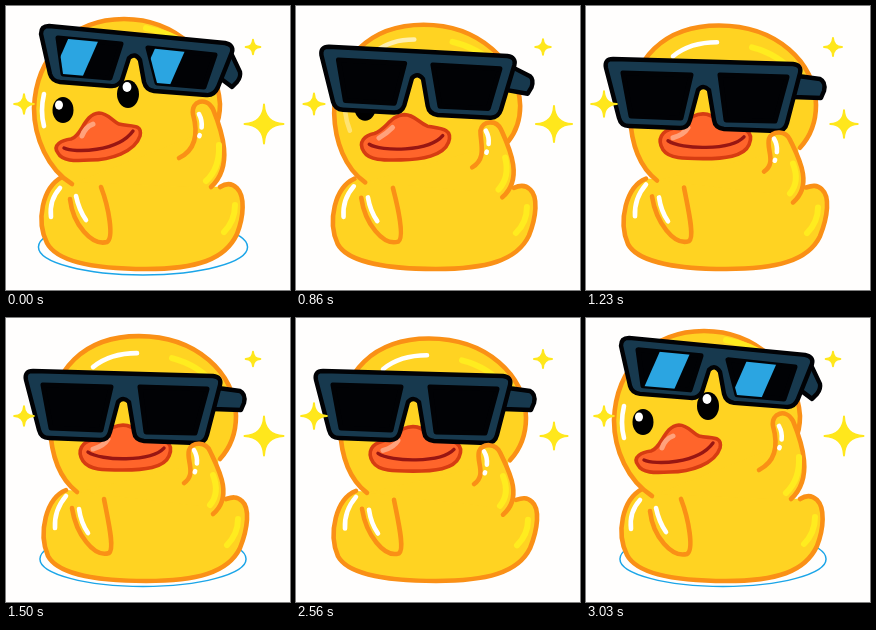
Recreate the animation shown at these times as an HTML page. Size 284 by 284 pixels, loop 3060 ms.

```html
<!DOCTYPE html>
<html lang="en">
<head>
<meta charset="utf-8">
<title>Duck with sunglasses</title>
<style>
  html, body { margin: 0; width: 100%; height: 100%; overflow: hidden; background: #fffefd; }
  svg { display: block; width: 100vw; height: 100vh; }
  path, ellipse { stroke-linecap: round; stroke-linejoin: round; }
  .star { fill: #ffe71c; stroke: #ffe71c; stroke-width: 2; }
  .ring { fill: none; stroke: #1ba5e8; }
  .skin { fill: #ffd322; stroke: #fa9016; stroke-width: 4.6; }
  .fill { fill: #ffd322; }
  .fold { fill: none; stroke: #fa9016; stroke-width: 4.6; }
  .shine { fill: none; stroke: #fff; stroke-width: 4.6; }
  .dash { stroke-dasharray: 14 8 1 99; }
  .glow { fill: none; stroke: #ffec1f; stroke-width: 6; }
  .beak { fill: #ff652b; stroke: #d63c12; stroke-width: 3.6; }
  .mouth { fill: none; stroke: #981612; stroke-width: 3.4; }
  .gleam { fill: none; stroke: #ffa27c; stroke-width: 5; }
  .frame { fill: #17394e; stroke: #010205; stroke-width: 4.4; }
  .lens { fill: #010205; stroke: #010205; stroke-width: 5; }
  .band { fill: #2ba5e1; }
</style>
</head>
<body>
<svg viewBox="0 0 284 284" preserveAspectRatio="none">
  <defs>
    <clipPath id="clip0"><path/></clipPath>
    <clipPath id="clip1"><path/></clipPath>
  </defs>
  <ellipse class="ring" cx="137" cy="241"/>
  <g id="duck">
    <g id="body"></g>
    <g id="eyes">
      <ellipse rx="10.5" ry="13"/><ellipse rx="11" ry="14"/>
      <ellipse rx="4" ry="4.6" fill="#fff"/><ellipse rx="4.4" ry="5" fill="#fff"/>
    </g>
    <g id="face"></g>
  </g>
  <g id="glasses"></g>
  <g id="arm"></g>
  <g id="stars"></g>
</svg>
<script>
const LOOP = 3060, BEAT = LOOP / 2, TAU = Math.PI * 2;
const $ = s => document.querySelector(s);
const mix = (a, b, k) => a + (b - a) * k;
const ease = (t, from, to) => {
  const x = Math.min(1, Math.max(0, (t - from) / (to - from)));
  return x * x * (3 - 2 * x);
};
const pulse = (t, at, width) => Math.exp(-(((t - at) / width) ** 2));

function add(parent, cls) {
  const el = document.createElementNS('http://www.w3.org/2000/svg', 'path');
  el.setAttribute('class', cls);
  return $(parent).appendChild(el);
}

// Each part has a path with the glasses up and one with the glasses down.
const parts = [];
function part(parent, cls, up, down) {
  const numbers = down.match(/-?[\d.]+/g).map(Number);
  const p = { el: add(parent, cls), up, numbers };
  parts.push(p);
  return p;
}
function blend({ up, numbers }, k) {
  let i = 0;
  return up.replace(/-?[\d.]+/g, n => mix(+n, numbers[i++], k).toFixed(2));
}

part('#body', 'skin',
  'M56 171C36 182 30 215 41 237C51 256 90 263 140 263C190 263 219 254 231 228C238 210 239 190 231 182C226 177 220 177 214 181',
  'M60 172C40 180 32 215 42 238C52 257 95 263 140 263C190 263 222 255 234 230C242 210 244 190 236 183C231 178 226 179 220 181');
part('#body', 'fill', 'M66 176L60 95L206 100L206 182Z', 'M71 174L62 95L213 128L210 190Z');
part('#body', 'skin',
  'M66 178C42 163 28 132 28 102C30 50 66 13 118 13C170 13 211 52 214 98C214 108 212 116 209 122',
  'M71 174C53 160 45 135 44 108C43 50 80 18 133 18C190 18 230 55 230 98C230 116 224 130 214 141');
part('#body', 'fold',
  'M95 181C103 202 108 232 101 236C86 240 67 219 64 193',
  'M98 181C102 202 109 231 103 235C88 240 70 216 66 190');
part('#body', 'shine', 'M54 182Q43 194 45 211', 'M60 178Q48 192 49 210');
part('#body', 'shine', 'M70 190Q73 204 80 214', 'M73 191Q75 205 82 215');
part('#body', 'glow', 'M229 199Q229 215 218 226', 'M232 201Q232 216 221 227');
part('#body', 'glow', 'M140 22Q165 27 180 38', 'M166 40Q193 47 209 67');
const topShine = part('#body', 'shine', 'M67 33Q78 24 96 24', 'M87 49Q104 35 131 35').el;
const sideShine = part('#body', 'shine', 'M38 120Q34 105 38 88', 'M63 125Q54 105 57 87').el;

part('#arm', 'skin',
  'M173 152C191 143 192 126 187 108C185 95 200 90 207 103C216 125 228 160 205 181',
  'M178 165C191 156 180 142 183 132C187 123 200 124 204 133C212 150 228 178 207 196');
part('#arm', 'shine dash', 'M193 108Q199 119 192 133', 'M188 132Q194 142 188 156');
part('#arm', 'glow', 'M213 139Q214 162 200 175', 'M207 157Q214 175 204 187');

part('#face', 'beak',
  'M52 147C46 139 56 134 65 133C76 130 78 108 93 107C102 107 106 115 113 118C124 121 137 117 134 130C129 146 104 154 84 154C68 155 56 155 52 147Z',
  'M77 143C70 132 77 124 86 122C98 118 104 107 117 107C128 107 132 115 142 119C158 121 169 124 163 138C158 150 138 152 117 152C98 152 83 152 77 143Z');
part('#face', 'mouth', 'M58 142C68 147 112 146 127 125', 'M82 134C95 143 145 144 158 130');
part('#face', 'gleam', 'M76 130Q79 121 87 118', 'M87 131Q98 128 102 121');

part('#glasses', 'frame',
  'M225 47L234 66Q235 71 231 76L226 81L214 72Z',
  'M212 70L234 73Q240 76 238 85L235 92L207 91Z');
part('#glasses', 'frame',
  'M43 20L219 37Q228 39 226 46L212 81Q208 90 200 89L148 85Q140 84 138 76L134 54Q129 46 123 52L116 74Q112 81 104 80L54 76Q46 75 44 68L35 28Q35 20 43 20Z',
  'M27 53L207 58Q216 59 214 67L201 117Q199 125 191 125L138 123Q129 122 128 114L123 84Q117 78 112 84L104 114Q102 122 94 122L43 120Q35 120 33 112L20 62Q18 53 27 53Z');

const lenses = [
  ['M52 32L115 38L104 72L57 68Z', 'M37 67L105 69L95 112L45 110Z', 53, 40],
  ['M142 42L209 49L198 81L151 77Z', 'M134 69L201 71L189 115L140 114Z', 144, 134]
].map(([up, down, upX, downX], i) => {
  const shape = part('#glasses', 'lens', up, down);
  const band = add('#glasses', 'band');
  band.setAttribute('clip-path', `url(#clip${i})`);
  return { shape, band, upX, downX, clip: $(`#clip${i} path`) };
});

const eyes = [...$('#eyes').children];
const eyeSpots = [
  [57, 104, 76, 98], [122, 88, 160, 96],
  [53, 99, 72, 93], [121, 81, 160, 89]
];

// x, y, mean radius, swing of the radius
const stars = [[258, 118, 17, 3.5], [18, 98, 12.6, -1.8], [247, 41, 9.3, -1]]
  .map(spec => ({ spec, el: add('#stars', 'star') }));

function starPath(x, y, r) {
  const c = r * 0.04;
  return `M${x} ${y - r}Q${x + c} ${y - c} ${x + r} ${y}Q${x + c} ${y + c} ${x} ${y + r}` +
    `Q${x - c} ${y + c} ${x - r} ${y}Q${x - c} ${y - c} ${x} ${y - r}Z`;
}

function stretch(id, sy, dx = 0, dy = 0) {
  $(id).setAttribute('transform', `translate(${dx} ${263 * (1 - sy) + dy}) scale(1 ${sy})`);
}

function draw(t) {
  const p = t % BEAT;
  const drop = ease(t, 690, 970);
  const windUp = 0.08 * ease(t, 0, 530) * (1 - drop);
  const k = drop - ease(t, 2710, 2990) - windUp;

  for (const { spec: [x, y, r, swing], el } of stars)
    el.setAttribute('d', starPath(x, y, r - 1 + swing * Math.cos(TAU * (p + 20) / (BEAT / 2))));

  // Ripple spreading from under the duck
  const age = p > BEAT - 150 ? p - BEAT : p;
  const ring = $('.ring');
  ring.setAttribute('rx', 104.5 + age * 0.05);
  ring.setAttribute('ry', 28 + age * 0.021);
  ring.setAttribute('stroke-width', Math.max(0, Math.min(1.5, 1.5 * (1 - age / 340))));
  ring.style.opacity = age < 340 ? 1 : 0;

  // Breathing, with a stretch at each change of pose; the glasses do not breathe
  const sink = (1 - Math.cos(TAU * (p / BEAT - 0.05))) / 2;
  const rise = 1 + 0.037 * (pulse(t, 735, 70) + pulse(t, 2910, 60));
  const settle = pulse(t, 1020, 60);
  stretch('#duck', rise - 0.012 * sink);
  stretch('#arm', rise - 0.012 * sink);
  stretch('#glasses', rise, 2 * settle, -3 * settle);

  for (const part of parts) part.el.setAttribute('d', blend(part, k));
  topShine.style.opacity = k;
  sideShine.style.opacity = 1 - k;
  eyes.forEach((eye, i) => {
    const [x, y, x2, y2] = eyeSpots[i];
    eye.setAttribute('cx', mix(x, x2, k));
    eye.setAttribute('cy', mix(y, y2, k));
  });

  // Reflection running right to left across both lenses
  const start = t > 500 && t < 2000 ? 1060 : 3030;
  const since = t < 500 ? t + LOOP - start : t - start;
  const shift = 12 - 0.4 * since;
  const lean = mix(10, 2, k);
  for (const { shape, band, upX, downX, clip } of lenses) {
    const x = mix(upX, downX, k) + shift, top = mix(32, 66, k), low = top + 50;
    clip.setAttribute('d', blend(shape, k));
    band.setAttribute('d', `M${x + lean} ${top}h31L${x + 31 - lean * 1.2} ${low}h-31Z`);
    band.style.opacity = shift < 75 && shift > -50 ? 1 : 0;
  }
}

const begin = performance.now();
function tick() {
  draw((performance.now() - begin) % LOOP);
  requestAnimationFrame(tick);
}
tick();
</script>
</body>
</html>
```
